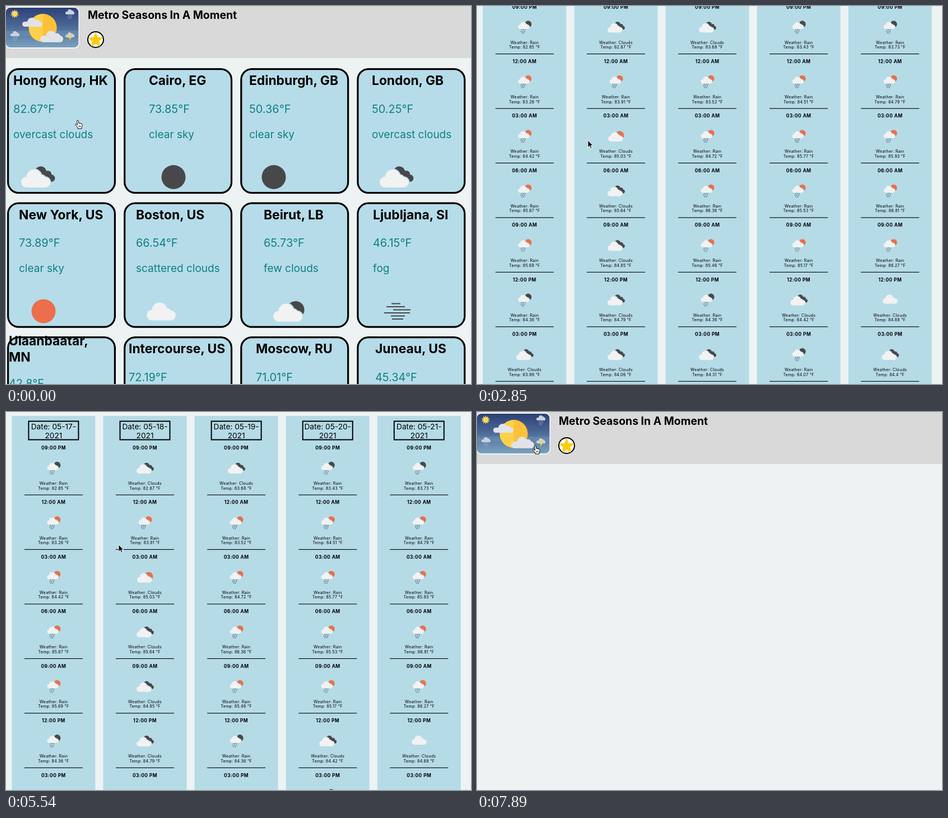
Recreate the animation shown at these times as an HTML page. Size 830x675 px, loop 8000 ms.

```html
<!DOCTYPE html>
<html lang="en">
<head>
<meta charset="utf-8">
<title>City weather</title>
<style>
html, body { margin: 0; width: 100%; height: 100%; overflow: hidden; background: #d9d9d9; }
svg { display: block; width: 830px; height: 675px; font-family: Inter, Roboto, sans-serif; }
.bold { font-weight: 700; }
.teal { fill: #108080; }
.mid { text-anchor: middle; }
.hour { font-weight: 700; letter-spacing: .45px; text-anchor: middle; }
.small { letter-spacing: .25px; text-anchor: middle; }
</style>
</head>
<body>
<svg viewBox="0 0 830 675">
  <defs>
    <linearGradient id="sky" x2="0" y2="1">
      <stop stop-color="#2a3f74"/><stop offset=".45" stop-color="#4b6796"/><stop offset="1" stop-color="#7ba3bd"/>
    </linearGradient>
    <clipPath id="frame"><rect x="-1" y="2" width="131" height="73" rx="9"/></clipPath>
    <g id="cloud">
      <circle cx="9.5" cy="22.5" r="9.5"/><circle cx="23" cy="13.5" r="13.5"/>
      <circle cx="36" cy="18" r="8"/><circle cx="43" cy="23" r="9"/>
      <rect x="9.5" y="17" width="33.5" height="15"/>
    </g>
    <g id="puff">
      <rect y="7" width="36" height="9" rx="4.5"/>
      <circle cx="17" cy="8" r="8"/><circle cx="26" cy="9.5" r="6"/>
    </g>
    <g id="front">
      <use href="#cloud" fill="#b6dce9" stroke="#b6dce9" stroke-width="3.4"/>
      <use href="#cloud" fill="#f2f2f2"/>
    </g>
    <path id="drops" d="M16 35l-1 3M24 34l-1 3M32 35l-1 3M14 42l-1 3M22 42l-1 3M30 42l-1 3M18 49l-1 3M26 49l-1 3"
      fill="none" stroke-width="4"/>
  </defs>
  <g id="view">
    <g id="header"></g>
    <g id="home"></g>
    <g id="loading"></g>
    <g id="forecast"></g>
    <rect id="blank" y="93" width="830" height="600" fill="#edf3f3"/>
  </g>
  <g id="cursor">
    <path id="arrow" d="M0 0V12.5L3 9.8 5 14.3 7 13.4 5.1 9H9Z" stroke="#fff" stroke-width=".9"/>
    <path id="hand" fill="#fff" stroke="#000" stroke-linejoin="round"
      d="M-1.5 1.2C-1-.3 1-.3 1.2 1.2L2 5.2 6 6C8 6.4 8.4 7.6 8 9.4L7 12.6V15H.2V13L-4 8.5C-4.9 7.2-3.2 6-2 7.2L-.4 8.5ZM2.3 9.5V12M4.5 9.5V12"/>
  </g>
</svg>
<script>
const el = id => document.getElementById(id);
const DARK = '#48484a', SUN = '#ec6e4c', PALE = '#edf3f3', KHAKI = '#e3e5b8', BLUE = '#b6dce9';

const text = (x, midY, size, str, cls = '') =>
  `<text x="${x}" y="${midY + size * .36}" font-size="${size}" class="${cls}">${str}</text>`;
const rect = (x, y, w, h, fill, extra = '') =>
  `<rect x="${x}" y="${y}" width="${w}" height="${h}" fill="${fill}" ${extra}/>`;
const circle = (x, y, r, fill, extra = '') => `<circle cx="${x}" cy="${y}" r="${r}" fill="${fill}" ${extra}/>`;
const place = (x, y, sx, sy, body) => `<g transform="translate(${x} ${y}) scale(${sx} ${sy})">${body}</g>`;

const front = '<use href="#front"/>';
const rain = disc => circle(46, 10, 15.5, disc) + front + '<use href="#drops" stroke="#3c4955"/>';
const icons = {
  overcast: circle(35, 4.5, 10.2, DARK) + circle(47.5, 8.5, 6.6, DARK) + circle(54, 15.5, 6.4, DARK) +
    rect(38, 6, 16, 15.8, DARK) + front,
  cloud: place(0, -2, 1, 1, front),
  night: circle(21.5, 13.5, 21.5, DARK),
  day: circle(21.5, 13.5, 21.5, SUN),
  fewNight: circle(40, 11, 15.5, DARK) + front,
  fewDay: circle(40, 11, 15.5, SUN) + front,
  rainNight: rain(DARK),
  rainDay: rain(SUN),
  fog: `<path d="M13 0h16M4 5.5h33M16 11h31M0 16.5h46M12 22h25M14 27.5h20" stroke="${DARK}" stroke-width="2"/>`
};
const icon = (name, x, y, s = 1) => place(x, y, s, s, icons[name]);

function star(cx, cy, outer, inner, points) {
  const pts = [];
  for (let i = 0; i < points * 2; i++) {
    const r = i % 2 ? inner : outer, a = i * Math.PI / points - Math.PI / 2;
    pts.push((cx + r * Math.cos(a)).toFixed(2) + ',' + (cy + r * Math.sin(a)).toFixed(2));
  }
  return `<polygon points="${pts.join(' ')}"`;
}

function header() {
  const puff = (x, y, sx, sy, fill = '#e1e3e9') => place(x, y, sx, sy, `<use href="#puff" fill="${fill}"/>`);
  const smallPuff = (x, y) => puff(x, y, .45, .56, '#c9d1de');
  const shower = (x, y) => smallPuff(x, y) +
    place(x, y - 2, .36, .36, '<use href="#drops" stroke="#a9bfd8"/>');
  const art = rect(-1, 2, 131, 73, 'url(#sky)') +
    rect(-1, 26, 131, 8, '#44608f', 'opacity=".4"') + rect(-1, 44, 131, 9, '#6d91b4', 'opacity=".5"') +
    circle(65.5, 39, 25, '#fdd04a') + '<path d="M65.5 14a25 25 0 0 1 0 50Z" fill="#fdc038"/>' +
    puff(29, 21, 1, 1) + puff(61, 44, 1.14, 1.3) +
    star(15.5, 14, 8, 4.5, 10) + ' fill="#f6cf55"/>' + circle(15.5, 14, 4.8, '#fbd660') +
    shower(106, 6) + shower(8, 45) + smallPuff(106, 47) +
    '<path d="M115 50l-5 7h4l-2 6 6-8h-4l3-5Z" fill="#f9cf3f"/>';
  return `<g clip-path="url(#frame)">${art}</g>` +
    rect(-1, 2, 131.3, 73, 'none', 'rx="9" stroke="#f3f5f7" stroke-width="1.8"') +
    text(146, 16.5, 19.4, 'Metro Seasons In A Moment', 'bold') +
    circle(160, 60, 14, '#fff', 'stroke="#000" stroke-width="2"') +
    star(160, 61, 13, 6, 5) + ' fill="#ffcc0a" stroke="#ffcc0a" stroke-linejoin="round"/>';
}

const credit = y => text(-9.5, y, 13.2, 'Data from GroundNimboAPI ©');

function home() {
  const cities = [
    [13, 'Hong Kong, HK', 82.67, 'overcast clouds', 'overcast', 27],
    [255, 'Cairo, EG', 73.85, 'clear sky', 'night', 277.5],
    [434, 'Edinburgh, GB', 50.36, 'clear sky', 'night', 456.5],
    [653, 'London, GB', 50.25, 'overcast clouds', 'overcast', 667],
    [23, 'New York, US', 73.89, 'clear sky', 'day', 45.5],
    [232, 'Boston, US', 66.54, 'scattered clouds', 'cloud', 251],
    [460, 'Beirut, LB', 65.73, 'few clouds', 'fewNight', 477],
    [655, 'Ljubljana, SI', 46.15, 'fog', 'fog', 675],
    [5, 'Ulaanbaatar,|MN', 42.8],
    [219, 'Intercourse, US', 72.19],
    [446, 'Moscow, RU', 71.01],
    [659, 'Juneau, US', 45.34]
  ];
  return rect(0, 93, 830, 600, PALE) + cities.map(([x, name, temp, sky, pic, picX], i) => {
    const top = 111 + Math.floor(i / 4) * 239.5, lines = name.split('|');
    const shift = lines.length > 1 ? 11 : 0;
    return rect(3.6 + i % 4 * 208.1, top + 1.6, 190.8, 221, BLUE, 'rx="19" stroke="#000" stroke-width="3.2"') +
      lines.map((s, k) => text(x, top + 22 + k * 29 - (shift && 14.5), 22.8, s, 'bold')).join('') +
      text(x, top + 72.5 + shift, 19.9, temp + '°F', 'teal') +
      (sky ? text(x, top + 118, 19, sky, 'teal') + icon(pic, picX, top + 181) : '');
  }).join('');
}

function forecast() {
  const hours = ['09:00 PM', '12:00 AM', '03:00 AM', '06:00 AM', '09:00 AM', '12:00 PM', '03:00 PM', '06:00 PM'];
  const skies = ['NRRRRNCC', 'CRFCCCCC', 'CRRRRNCN', 'NRRRRCNN', 'NRRRRcCC'];
  const temps = [
    [82.65, 83.26, 84.42, 85.87, 85.69, 84.36, 83.98, 83.19],
    [82.87, 83.91, 85.03, 85.64, 84.85, 84.79, 84.06, 83.08],
    [83.68, 83.52, 84.72, 86.38, 85.46, 84.36, 84.31, 83.93],
    [83.43, 84.51, 85.77, 85.53, 85.17, 84.42, 84.07, 83.77],
    [83.73, 84.79, 85.93, 86.81, 86.27, 84.88, 84.4, 83.95]
  ];
  // letter: icon, horizontal and vertical offset, scale
  const kinds = {
    N: ['rainNight', -11.5, 27, .39], R: ['rainDay', -11.5, 27, .39],
    C: ['overcast', -15, 29.5, .51], F: ['fewDay', -14, 29.2, .51], c: ['cloud', -13, 27.5, .51]
  };
  let out = rect(0, 93, 830, 59, '#fefefe') + rect(0, 152, 830, 9, KHAKI) + rect(0, 161, 830, 762, PALE) +
    rect(0, 923, 830, 9, KHAKI) + text(411, 123.5, 19.4, '5 Day Forecast For Hong Kong', 'bold mid');
  skies.forEach((sky, c) => {
    const left = 10.4 + c * 163.1, mid = left + 74.5;
    out += rect(left, 177.5, 149, 833, 'rgba(158,210,227,.7)') +
      rect(mid - 44.5, 187, 89, 33, 'none', 'stroke="#000" stroke-width="2"') +
      text(mid, 196.5, 13.7, `Date: 05-${17 + c}-`, 'mid') + text(mid, 212.5, 13.7, '2021', 'mid');
    hours.forEach((hour, r) => {
      const y = 234.5 + r * 97.45, [name, dx, dy, s] = kinds[sky[r]];
      out += text(mid, y, 8.4, hour, 'hour') + icon(name, mid + dx, y + dy, s) +
        text(mid, y + 63.5, 7.2, 'Weather: ' + ('NR'.includes(sky[r]) ? 'Rain' : 'Clouds'), 'small') +
        text(mid, y + 72, 7.2, `Temp: ${temps[c][r]} °F`, 'small') +
        rect(mid - 52, y + 83.5, 104, 1.1, '#000');
    });
  });
  return out + credit(970);
}

el('header').innerHTML = header();
el('home').innerHTML = home();
el('loading').innerHTML = rect(0, 177, 830, 500, '#fefefe') + credit(131);
el('forecast').innerHTML = forecast();

// The picture ticks every 150 ms, with a few shorter ticks.
const shortTicks = [21, 40, 42, 44, 46, 50];
const ticks = [0];
for (let i = 0; i < 53; i++) ticks.push(ticks[i] + (shortTicks.includes(i) ? 140 : 150));

const scrollPath = [[1800, 0], [2850, 233], [3440, 341], [3740, 341], [4040, 314], [4790, 192], [5090, 181],
  [5390, 181], [5540, 170.5], [6710, 0], [6860, -4], [7000, -2], [7150, 0]];
const pointerPath = [[0, 128, 204], [300, 123, 205], [450, 126, 205], [750, 133, 205], [1800, 133, 205],
  [2250, 198, 240], [4790, 198, 240], [5390, 199, 240], [5540, 201, 237], [6570, 204, 215], [7000, 205, 140],
  [7590, 104, 60]];

function along(path, t) {
  const next = path.findIndex(p => p[0] > t);
  if (next === 0) return path[0].slice(1);
  if (next < 0) return path[path.length - 1].slice(1);
  const a = path[next - 1], b = path[next], k = (t - a[0]) / (b[0] - a[0]);
  return a.slice(1).map((v, i) => v + (b[i + 1] - v) * k);
}
const show = (id, on) => el(id).setAttribute('display', on ? 'inline' : 'none');

function draw() {
  const now = performance.now() % 8000;
  const t = ticks.filter(v => v <= now).pop();
  const scene = t < 1350 ? 'home' : t < 1650 ? 'loading' : t < 7890 ? 'forecast' : 'blank';
  for (const id of ['home', 'loading', 'forecast', 'blank']) show(id, id === scene);
  const [scroll] = along(scrollPath, t), [x, y] = along(pointerPath, t);
  el('view').setAttribute('transform', `translate(0 ${-scroll})`);
  el('cursor').setAttribute('transform', `translate(${x} ${y})`);
  const onLink = scene === 'home' || (x < 130 && y < 75);
  show('hand', onLink);
  show('arrow', !onLink);
  requestAnimationFrame(draw);
}
draw();
</script>
</body>
</html>
```
